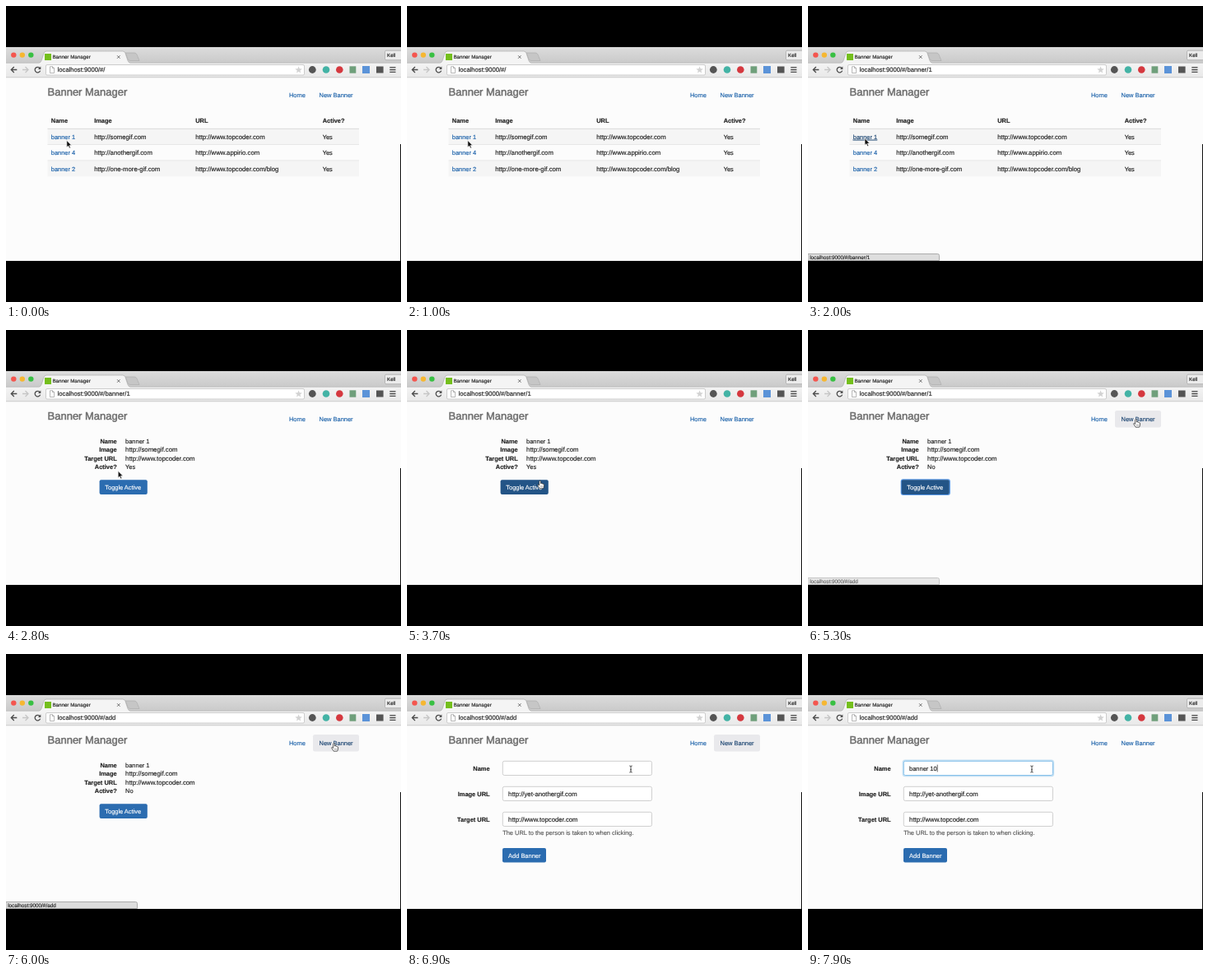
These frames come from a looping animation (480x360 px, 8 s). An HTML page:

```html
<!DOCTYPE html>
<html lang="en">
<head>
<meta charset="utf-8">
<title>Banner Manager</title>
<style>
html, body { margin: 0; width: 100%; height: 100%; overflow: hidden; background: #000; }
svg { display: block; width: 480px; height: 360px; }
text { font-family: "Liberation Sans", Arial, sans-serif; font-size: 7.45px; fill: #222; stroke: #222; stroke-width: .16px; text-rendering: geometricPrecision; white-space: pre; }
.b { font-weight: bold; }
.u { font-size: 7.76px; }
.l { fill: #1c62aa; stroke: #1c62aa; }
.l.on { fill: #1d4672; stroke: #1d4672; }
.w { fill: #fff; stroke: #fff; }
.r { text-anchor: end; }
.addr { font-size: 7.67px; }
.tab { font-size: 6.22px; }
.stat { font-size: 6.35px; }
.head { font-size: 12.98px; fill: #6b6b6b; stroke: #6b6b6b; stroke-width: .45px; }
.help { fill: #5c5c5c; stroke: #5c5c5c; }
</style>
</head>
<body>
<svg viewBox="0 0 480 360">
  <defs>
    <linearGradient id="strip" x2="0" y2="1"><stop stop-color="#dcdcdc"/><stop offset="1" stop-color="#c9c9c9"/></linearGradient>
    <linearGradient id="bar" x2="0" y2="1"><stop stop-color="#f4f4f4"/><stop offset="1" stop-color="#e8e8e8"/></linearGradient>
  </defs>
  <rect width="480" height="360"/>
  <rect y="50" width="480" height="260" fill="#fcfcfc"/>
  <rect y="50" width="480" height="20" fill="url(#strip)"/>
  <g id="lights"></g>
  <path d="M145 57H156Q158 57 159 59L162 66.500H151Q149 66.500 148 64.500Z" fill="#c6c6c6" stroke="#a9a9a9" stroke-width=".6"/>
  <rect y="69" width="480" height="18" fill="url(#bar)"/>
  <path d="M0 69.300H40Q42 69 43 66.500L46 57.500Q47 55 49 55H142Q144 55 145 57.500L148 66.500Q149 69 151 69.300H480" fill="#f4f4f4" stroke="#a5a5a5" stroke-width=".6"/>
  <path d="M41 70H150" stroke="#f4f4f4" stroke-width="1.300"/>
  <path d="M0 86.800H480" stroke="#bcbcbc" stroke-width=".7"/>
  <rect x="47" y="58" width="8" height="8" fill="#74bf1c"/>
  <text class="tab" x="56.400" y="64.200">Banner Manager</text>
  <path d="M135 60.200l3.600 3.600m0-3.600l-3.600 3.600" stroke="#666" stroke-width=".9"/>
  <rect x="460.500" y="54.200" width="22" height="11.500" rx="1.500" fill="#ececec" stroke="#a4a4a4" stroke-width=".7"/>
  <text class="tab" x="463" y="62">Kell</text>
  <g fill="none" stroke="#4c4c4c" stroke-width="1.300">
    <path d="M13.300 77.500H6.600M9.800 74L6.300 77.500L9.800 81"/>
    <path d="M20 77.500H26.700M23.500 74L27 77.500L23.500 81" stroke="#c6c6c6"/>
    <path d="M41 75.500A3.300 3.300 0 1 0 41.600 78.600"/>
    <path d="M42.300 73.600V76.900H39Z" fill="#4c4c4c" stroke="none"/>
  </g>
  <rect x="48.500" y="71.500" width="314" height="12.500" rx="1.500" fill="#fff" stroke="#b9b9b9" stroke-width=".7"/>
  <path d="M53.500 73.700H56.500L58.500 75.700V81.500H53.500ZM56.500 73.700V75.700H58.500" fill="#fff" stroke="#888" stroke-width=".6"/>
  <text class="addr" x="62.600" y="80.200">localhost:9000<tspan id="path"></tspan></text>
  <path id="star" fill="#d2d2d2"/>
  <g id="icons"></g>
  <path d="M466.300 74.600H473.500M466.300 77.500H473.500M466.300 80.400H473.500" stroke="#4c4c4c" stroke-width="1.400"/>
  <rect x="479" y="168" width="1" height="142" fill="#111"/>

  <text class="head" x="50.600" y="109.200">Banner Manager</text>
  <rect id="pill" x="373" y="98" width="56" height="20.500" rx="2.200" fill="#e9e9ec"/>
  <text class="l" x="344" y="110.800">Home</text>
  <text class="l" id="add" x="380.600" y="110.800">New Banner</text>

  <g id="list"></g>
  <g id="detail"></g>
  <g id="form"></g>

  <g id="status">
    <path d="M0 301.500H157.500Q159.500 301.500 159.500 303.500V309.500H0Z" fill="#dedede" stroke="#a4a4a4" stroke-width=".9"/>
    <text class="stat" id="hint" x="2.200" y="307.900"></text>
  </g>

  <g id="pointer">
    <path id="arrow" d="M0 0V8.300L1.900 6.600L3.200 9.500L4.600 8.900L3.300 6.100H5.900Z" fill="#111" stroke="#fff" stroke-width=".6"/>
    <g id="hand">
      <path d="M-.9 .7Q-.9 -.4 0 -.4Q.9 -.4 .9 .7V3Q2 2.400 2.500 3.300Q3.500 2.900 3.900 3.800Q5 3.500 5 4.800V6.500Q4.800 8 4 9.200H-.3Q-1.200 7.500-2.800 5.500Q-3 4.300-1.900 4.500L-.9 5.400Z" fill="#fff" stroke="#222" stroke-width=".7"/>
      <path d="M1 5.700V7.700M2.300 5.700V7.700M3.500 5.700V7.700" stroke="#444" stroke-width=".4"/>
    </g>
    <path id="beam" d="M-1.700-4Q0-4 0-3Q0-4 1.700-4M0-3V3M-1.700 4Q0 4 0 3Q0 4 1.700 4M-.8 .8H.8" fill="none" stroke="#222" stroke-width=".8"/>
  </g>
</svg>
<script>
const LOOP = 8000;
const $ = id => document.getElementById(id);
const show = (id, on) => $(id).setAttribute('display', on ? 'inline' : 'none');
const text = (x, y, s, cls = '', id = '') => `<text x="${x}" y="${y}" class="${cls}" id="${id}">${s}</text>`;
const box = (x, y, w, h, fill, more = '') => `<rect x="${x}" y="${y}" width="${w}" height="${h}" fill="${fill}" ${more}/>`;
const dot = (x, y, r, fill) => `<circle cx="${x}" cy="${y}" r="${r}" fill="${fill}"/>`;

// Browser chrome
$('lights').innerHTML = ['#f4564f', '#f6b731', '#39c043'].map((c, i) => dot(9.3 + i * 10.5, 59.6, 3.2, c)).join('');
$('icons').innerHTML = dot(372.3, 77.5, 4.4, '#555') + dot(389, 77.5, 4.3, '#43b3a5') + dot(405.3, 77.5, 4.3, '#d5383f') +
  box(417.5, 73.3, 7.8, 8.4, '#6f9f7b') + box(433, 73, 9, 9, '#5b93d8') + box(450, 73.5, 8.6, 8, '#555');
$('star').setAttribute('d', 'M' + [...Array(10).keys()].map(i => {
  const a = i * Math.PI / 5, r = i % 2 ? 1.9 : 4.5;
  return (355.6 + r * Math.sin(a)).toFixed(2) + ' ' + (77.8 - r * Math.cos(a)).toFixed(2);
}).join('L') + 'Z');

// Banner table
const cols = [54.8, 107.2, 230.2, 384.7];
const rows = [
  ['banner 1', 'http://somegif.com', 'http://www.topcoder.com', 'Yes'],
  ['banner 4', 'http://anothergif.com', 'http://www.appirio.com', 'Yes'],
  ['banner 2', 'http://one-more-gif.com', 'http://www.topcoder.com/blog', 'Yes']
];
const styles = ['l', 'u', 'u', ''];
$('list').innerHTML =
  ['Name', 'Image', 'URL', 'Active?'].map((s, i) => text(cols[i], 142, s, 'b')).join('') +
  rows.map((row, k) => {
    const y = 149.2 + k * 19.4;
    return box(50.5, y, 378.5, 19.4, k % 2 ? '#fcfcfc' : '#f5f5f5') +
      box(50.5, y - .4, 378.5, k ? .6 : 1, '#dadada') +
      row.map((s, i) => text(cols[i], y + 12.5, s, styles[i], k + i ? '' : 'first')).join('');
  }).join('');

// Banner details
$('detail').innerHTML =
  [['Name', 'banner 1', ''], ['Image', 'http://somegif.com', 'u'], ['Target URL', 'http://www.topcoder.com', 'u'], ['Active?', 'Yes', '']]
    .map(([k, v, cls], i) => {
      const y = 137.5 + i * 10.6;
      return text(134.7, y, k, 'b r') + text(145.1, y, v, cls, i === 3 ? 'state' : '');
    }).join('') +
  box(113.3, 181.8, 59, 18.6, 'none', 'id="glow" rx="2.4" stroke="#5a9bea" stroke-width="1.3"') +
  box(113.6, 182.3, 58.2, 17.6, '#2b6cb0', 'id="btn" rx="2"') +
  text(120.3, 193.7, 'Toggle Active', 'w');

// New banner form
$('form').innerHTML =
  [['Name', ''], ['Image URL', 'http://yet-anothergif.com'], ['Target URL', 'http://www.topcoder.com']].map(([k, v], i) => {
    const y = 130.3 + i * 31;
    return text(100.6, y + 11.2, k, 'b r') +
      box(116.3, y, 181.2, 17.2, '#fff', `id="in${i}" rx="2" stroke="#c4c4c4" stroke-width=".8"`) +
      text(123.1, y + 11.2, v, i ? 'u' : '', i ? '' : 'typed');
  }).join('') +
  box(115.3, 129.3, 183.2, 19.2, 'none', 'id="halo" rx="2.8" stroke="#a9d3f0" stroke-opacity=".7" stroke-width="1.4"') +
  box(0, 134.6, .7, 8.8, '#222', 'id="caret"') +
  text(116.2, 220.1, 'The URL to the person is taken to when clicking.', 'help') +
  box(116, 236, 53, 17.6, '#2b6cb0', 'rx="2"') +
  text(123.1, 247.5, 'Add Banner', 'w');

// Pointer track: time, x, y
const track = [
  [0, 73.8, 163.5], [1000, 73.8, 163.5], [1500, 69, 161], [2300, 69, 161], [2800, 136.2, 171.5],
  [3500, 161.6, 183.6], [4600, 161.6, 183.6], [5300, 398.5, 109], [6100, 398.5, 109], [6800, 272, 140], [LOOP, 272, 140]
];
function pointerAt(t) {
  const i = track.findIndex(k => k[0] > t);
  const [t0, x0, y0] = track[i - 1], [t1, x1, y1] = track[i];
  const p = (t - t0) / (t1 - t0), e = p * p * (3 - 2 * p);
  return [x0 + (x1 - x0) * e, y0 + (y1 - y0) * e];
}
const fade = (t, from, to) => Math.max(0, Math.min(1, (t - from) / (to - from)));

function draw(t) {
  const [x, y] = pointerAt(t);
  const over = (l, top, r, b) => x >= l && x <= r && y >= top && y <= b;
  const page = t < 2100 ? 'list' : t < 6100 ? 'detail' : 'form';
  ['list', 'detail', 'form'].forEach(id => show(id, id === page));
  $('path').textContent = t < 1900 ? '/#/' : t < 5700 ? '/#/banner/1' : '/#/add';

  const onLink = over(54, 155, 84, 163);
  const onNav = over(373, 98, 429, 118.5);
  const onBtn = page === 'detail' && over(113.5, 182, 172, 200);
  const onField = page === 'form' && over(116, 130, 298, 148);

  $('first').setAttribute('text-decoration', onLink ? 'underline' : 'none');
  $('first').classList.toggle('on', onLink);
  const navOn = onNav || (t >= 5700 && t < 7000);
  show('pill', navOn);
  $('add').classList.toggle('on', navOn);

  const focused = t >= 4000 && t < 5700;
  $('state').textContent = t < 4100 ? 'Yes' : 'No';
  show('glow', focused);
  $('btn').setAttribute('fill', onBtn || focused ? '#235486' : '#2b6cb0');

  const typing = t >= 7000;
  const n = Math.max(0, Math.floor((t - 7050) / 90));
  $('typed').textContent = 'banner 10'.slice(0, n);
  $('in0').setAttribute('stroke', typing ? '#62aee5' : '#c4c4c4');
  show('halo', typing);
  show('caret', typing);
  if (typing) $('caret').setAttribute('x', 123.3 + (n ? $('typed').getComputedTextLength() : 0));

  const first = t < 4000;
  $('hint').textContent = 'localhost:9000/#/' + (first ? 'banner/1' : 'add');
  $('status').setAttribute('opacity', first
    ? fade(t, 1400, 1550) * (1 - fade(t, 2300, 2550))
    : fade(t, 5200, 5350) * (1 - fade(t, 6250, 6500)));

  $('pointer').setAttribute('transform', `translate(${x.toFixed(2)} ${y.toFixed(2)})`);
  const kind = onBtn || (onNav && t > 5000) ? 'hand' : onField ? 'beam' : 'arrow';
  ['arrow', 'hand', 'beam'].forEach(id => show(id, id === kind));
}

const start = performance.now();
function tick() {
  draw((performance.now() - start) % LOOP);
  requestAnimationFrame(tick);
}
tick();
</script>
</body>
</html>
```
